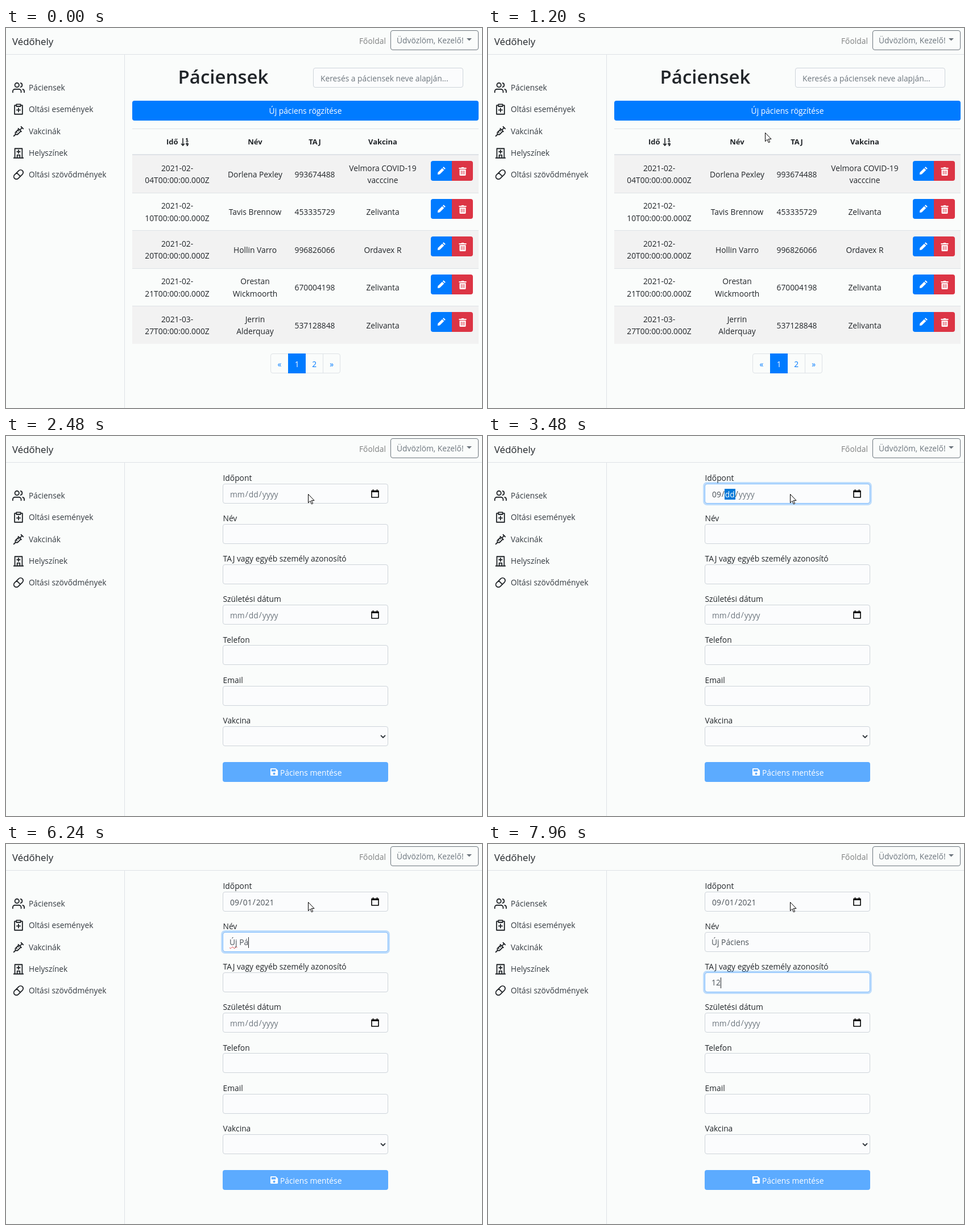
An HTML page that plays this animation: 837 px wide and 669 px high, repeating every 8 s.

```html
<!DOCTYPE html>
<html lang="hu">
<head>
<meta charset="utf-8">
<title>Páciensek</title>
<style>
  html, body { margin: 0; width: 100%; height: 100%; overflow: hidden; background: #fafcfb; }
  body { font: 13.8px/21.6px "Open Sans", "Noto Sans", sans-serif; color: #212529; }
  #stage { position: relative; width: 837px; height: 669px; overflow: hidden; }
  #stage div, #stage svg { position: absolute; box-sizing: border-box; }
  #list, #form { inset: 0; }
  .text { white-space: pre; }
  .mid { width: 240px; margin-left: -120px; text-align: center; }
  .bold { font-weight: 700; font-size: 13px; }
  .title { font-size: 33px; font-weight: 600; }
  .brand { font-size: 16.9px; }
  .nav { color: #343a40; }
  .faint { color: #7f8080; }
  .grey { color: #6c757d; }
  .white { color: #fff; }
  .link { color: #007bff; }
  .line { background: #dee2e6; }
  .field { border: 1px solid #ced4da; border-radius: 4px; background: #fbfcfd; }
  .outline { border: 1px solid #6c757d; border-radius: 4px; }
  .primary { background: #007bff; }
  .danger { background: #dc3545; }
  .dark { background: #0069d9; }
  .pale { background: #5cabff; }
  .round { border-radius: 4px; }
  .left { border-radius: 4px 0 0 4px; }
  .right { border-radius: 0 4px 4px 0; }
  .page { border: 1px solid #dee2e6; }
  .row { border-top: 1px solid #dee2e6; }
  .row.odd { background: #f2f2f2; }
  .row.hover { background: #ebebec; }
  .ring { inset: -1px; border: 1px solid #80bdff; border-radius: 4px; box-shadow: 0 0 0 2.9px rgba(0, 123, 255, .25); opacity: 0; }
  .value { left: 11px; top: 1px; height: 32px; display: flex; align-items: center; white-space: pre; color: #495057; }
  .seg { padding: 0 1px; line-height: 19px; }
  .empty { color: #6c757d; }
  .seg.on { background: #0078d7; color: #fff; }
  .caret { width: 1px; height: 19px; margin-right: -1px; background: #212529; }
  .typo { text-decoration: underline wavy #e03c3c 1px; text-decoration-skip-ink: none; text-underline-offset: 2px; }
</style>
</head>
<body>
<div id="stage">
  <div id="list"></div>
  <div id="form"></div>
</div>
<script>
const stage = document.getElementById('stage');
const list = document.getElementById('list');
const form = document.getElementById('form');

function add(parent, cls, css, html = '') {
  const el = document.createElement('div');
  el.className = cls;
  el.style.cssText = css;
  el.innerHTML = html;
  return parent.appendChild(el);
}
const box = (parent, x, y, w, h, cls) =>
  add(parent, cls, `left:${x}px;top:${y}px;width:${w}px;height:${h}px`);

// y is the vertical centre of the text block
function text(parent, x, y, str, cls = '') {
  const lines = str.split('\n').length;
  return add(parent, 'text ' + cls, `left:${x}px;top:${y - 10.8 * lines + .75}px`, str);
}
function icon(parent, x, y, size, view, body) {
  parent.insertAdjacentHTML('beforeend',
    `<svg style="left:${x}px;top:${y}px" width="${size}" height="${size}" viewBox="0 0 ${view} ${view}">${body}</svg>`);
  return parent.lastElementChild;
}
const stroke = (d, color = '#212529', w = 2) =>
  `<path d="${d}" fill="none" stroke="${color}" stroke-width="${w}" stroke-linecap="round" stroke-linejoin="round"/>`;
const fill = (d, color = '#fff') => `<path d="${d}" fill="${color}" fill-rule="evenodd"/>`;

const pencil = fill('M11.5 1.2l3.3 3.3L13.2 6.1 9.9 2.8zM9 3.7L12.3 7l-7.6 7.6L1 15l.4-3.7z');
const trash = fill('M1.5 2h4l1-1h3l1 1h4v2h-13zM2.5 5h11v9.5a1.5 1.5 0 0 1-1.5 1.5H4a1.5 1.5 0 0 1-1.5-1.5z')
  + stroke('M5.5 7.3v6M8 7.3v6M10.5 7.3v6', '#dc3545', 1);
const save = fill('M1 2.5A1.5 1.5 0 0 1 2.5 1H11l4 4v8.5a1.5 1.5 0 0 1-1.5 1.5h-11A1.5 1.5 0 0 1 1 13.5zM3 3v4h8V3zM8 9a2.2 2.2 0 1 0 0 4.4a2.2 2.2 0 1 0 0-4.4');
const calendar = stroke('M2 3.5h12V15H2zM4.5 1.5v2M11.5 1.5v2', '#000', 1.6) + fill('M2 3h12v3H2z', '#000');
const sort = stroke('M4 1.5v12M1.5 11L4 14l2.5-3M10 2.5l1.5-1v5M10 6.5h3M13 11a1.5 1.5 0 1 1 0-.1v1.5l-1.5 2', '#212529', 1.6);

// Header and sidebar
text(stage, 11, 22.6, 'Védőhely', 'brand');
text(stage, 621, 22, 'Főoldal', 'faint');
box(stage, 676, 4, 155, 35, 'outline');
text(stage, 687, 21, 'Üdvözlöm, Kezelő!', 'grey');
icon(stage, 810, 18, 9, 9, fill('M0 0h9L4.5 4.5z', '#6c757d'));
box(stage, 0, 46, 837, 1, 'line');
box(stage, 208, 47, 1, 622, 'line');
[
  ['Páciensek', 'M9 3a4 4 0 1 1 0 8a4 4 0 1 1 0-8M17 21v-2a4 4 0 0 0-4-4H5a4 4 0 0 0-4 4v2M23 21v-2a4 4 0 0 0-3-3.87M16 3.13a4 4 0 0 1 0 7.75'],
  ['Oltási események', 'M8 4.5H4.5V21.5h15v-17H16M8 2.5h8v4H8zM12 10v7M8.5 13.5h7'],
  ['Vakcinák', 'M17 3l4 4M19 5l-4.5 4.5M11.5 6.5l6 6M16.5 11.5L10 18H6v-4l6.5-6.5M7.5 12.5L9 14M10.5 9.5L12 11M3 21l3-3'],
  ['Helyszínek', 'M3 21.5h18M5 21V3.5h14V21M9.5 21v-5h5v5M12 6.5v6M9 9.5h6'],
  ['Oltási szövődmények', 'M4.5 12.5l8-8a4.94 4.94 0 0 1 7 7l-8 8a4.94 4.94 0 0 1-7-7M8.5 8.5l7 7'],
].forEach(([name, d], i) => {
  const y = 104 + 38.3 * i;
  icon(stage, 11, y - 10, 22, 24, stroke(d));
  text(stage, 40, y, name, 'nav');
});

// Patient list
text(list, 382, 85.5, 'Páciensek', 'mid title');
box(list, 540, 70, 264, 35, 'field');
text(list, 553, 88.5, 'Keresés a páciensek neve alapján...', 'grey');
box(list, 222, 128, 609, 35, 'primary round');
const hoverFill = box(list, 222, 128, 609, 35, 'dark round');
text(list, 526.5, 145.2, 'Új páciens rögzítése', 'mid white');
box(list, 222, 177, 609, 1, 'line');
text(list, 282, 200, 'Idő', 'bold');
icon(list, 307, 193, 15, 15, sort);
text(list, 438, 200, 'Név', 'mid bold');
text(list, 543, 200, 'TAJ', 'mid bold');
text(list, 662.5, 200, 'Vakcina', 'mid bold');

const rowTop = i => Math.round(223.3 + 66.5 * i);
const rows = [
  ['02-\n04', 'Dorlena Pexley', '993674488', 'Velmora COVID-19\nvacccine'],
  ['02-\n10', 'Tavis Brennow', '453335729', 'Zelivanta'],
  ['02-\n20', 'Hollin Varro', '996826066', 'Ordavex R'],
  ['02-\n21', 'Orestan\nWickmoorth', '670004198', 'Zelivanta'],
  ['03-\n27', 'Jerrin\nAlderquay', '537128848', 'Zelivanta'],
].map(([date, name, taj, vaccine], i) => {
  const y = rowTop(i), mid = 256.6 + 66.5 * i;
  const row = box(list, 222, y, 609, rowTop(i + 1) - y, i % 2 ? 'row' : 'row odd');
  text(list, 301, mid, `2021-${date}T00:00:00.000Z`, 'mid');
  text(list, 438, mid, name, 'mid');
  text(list, 543, mid, taj, 'mid');
  text(list, 662.5, mid, vaccine, 'mid');
  box(list, 747, y + 11, 37, 35, 'primary left');
  box(list, 784, y + 11, 37, 35, 'danger right');
  icon(list, 758, y + 20, 16, 16, pencil);
  icon(list, 794.5, y + 20.5, 16, 16, trash);
  return row;
});
box(list, 222, 222, 609, 2, 'line');

box(list, 465, 573, 123, 35, 'page round');
box(list, 496, 573, 31, 35, 'primary');
box(list, 557, 573, 1, 35, 'line');
['«', '1', '2', '»'].forEach((s, i) =>
  text(list, 481 + 30.6 * i, 591, s, i === 1 ? 'mid white' : 'mid link'));

// New patient form
const fields = ['Időpont', 'Név', 'TAJ vagy egyéb személy azonosító', 'Születési dátum', 'Telefon', 'Email', 'Vakcina']
  .map((name, i) => {
    const y = 73.2 + 71.1 * i;
    text(form, 381.5, y, name);
    const field = box(form, 381, Math.round(y + 10.8), 291, 35, 'field');
    return { ring: add(field, 'ring', ''), value: add(field, 'value', ''), field };
  });
for (const i of [0, 3]) icon(fields[i].field, 259, 8, 16, 16, calendar);
icon(fields[6].field, 276, 14, 10, 10, stroke('M1.5 1.5L5 5l3.5-3.5', '#343a40', 1.8));
box(form, 381, 574, 291, 35, 'pale round');
icon(form, 464, 584, 15, 16, save);
text(form, 482, 592, 'Páciens mentése', 'white');

const pointer = icon(stage, 0, 0, 20, 20,
  '<path d="M.5.5v15.2l3.5-3.4 2.4 5.5 2.2-1-2.4-5.3h4.8z" fill="#fff" stroke="#000"/>');

// Timeline
const FORM_AT = 1680, BUTTON_AT = 1280;
const FOCUS = [2490, 4960, 7360, Infinity];
const path = [
  [360, 414, 664], [480, 417, 606], [600, 421, 540], [740, 428, 446], [880, 437, 358],
  [1020, 458, 266], [1160, 482, 195], [1280, 497, 161], [1480, 508, 148],
  [1880, 508, 148], [2000, 510, 143], [2180, 520, 124], [2340, 529, 107], [2480, 531, 102],
];
const keys = {
  month: [[0, 'mm'], [3440, '00'], [3480, '09']],
  day: [[0, 'dd'], [3720, '00'], [3800, '01']],
  year: [[0, 'yyyy'], [4360, '0002'], [4400, '0020'], [4560, '0202'], [4720, '2021']],
  name: [[5520, 'Ú'], [5760, 'j'], [5840, ' '], [6080, 'P'], [6240, 'á'], [6440, 'c'], [6600, 'i'], [6800, 'e'], [6880, 'n'], [7040, 's']],
  taj: [[7800, '1'], [7960, '2']],
};

const clamp = v => Math.min(1, Math.max(0, v));
const fade = (t, from) => { const k = clamp((t - from) / 150); return k * k * (3 - 2 * k); };
const pressed = (steps, t) => steps.filter(([at]) => at <= t);

function pointerAt(t) {
  const next = path.findIndex(p => p[0] > t);
  if (next < 0) return path[path.length - 1].slice(1);
  const [a, b] = [path[next - 1], path[next]];
  const k = (t - a[0]) / (b[0] - a[0]);
  return [a[1] + (b[1] - a[1]) * k, a[2] + (b[2] - a[2]) * k];
}

function dateHtml(t) {
  const active = t < FOCUS[0] || t >= FOCUS[1] ? -1 : t < 3480 ? 0 : t < 3800 ? 1 : 2;
  return ['month', 'day', 'year'].map((part, i) => {
    const value = pressed(keys[part], t).pop()[1];
    const cls = (/\d/.test(value) ? '' : ' empty') + (i === active ? ' on' : '');
    return `<span class="seg${cls}">${value}</span>`;
  }).join(`<span class="${t < 3440 ? 'empty' : ''}">/</span>`);
}

function typedHtml(steps, t, from, to) {
  const done = pressed(steps, t);
  let str = done.map(k => k[1]).join('');
  if (t < from || t >= to) return `<span>${str}</span>`;
  if (str.startsWith('Új ')) str = '<span class="typo">Új</span>' + str.slice(2);
  const last = done.length ? done[done.length - 1][0] : from;
  const caret = t - last < 480 ? '<i class="caret"></i>' : '';
  return `<span>${str}</span>${caret}`;
}

function setHtml(el, html) {
  if (el.shown !== html) el.innerHTML = el.shown = html;
}

function draw(t) {
  const onForm = t >= FORM_AT;
  list.style.display = onForm ? 'none' : '';
  form.style.display = onForm ? '' : 'none';

  const moving = t >= path[0][0];
  pointer.style.display = moving ? '' : 'none';
  const [x, y] = moving ? pointerAt(t) : [0, 0];
  pointer.style.transform = `translate(${Math.round(x)}px,${Math.round(y)}px)`;

  rows.forEach((row, i) => row.classList.toggle('hover', y >= rowTop(i) && y < rowTop(i + 1)));
  hoverFill.style.opacity = fade(t, BUTTON_AT);

  for (let i = 0; i < 3; i++)
    fields[i].ring.style.opacity = fade(t, FOCUS[i]) - fade(t, FOCUS[i + 1]);
  setHtml(fields[0].value, dateHtml(t));
  setHtml(fields[1].value, typedHtml(keys.name, t, FOCUS[1], FOCUS[2]));
  setHtml(fields[2].value, typedHtml(keys.taj, t, FOCUS[2], FOCUS[3]));
  setHtml(fields[3].value, dateHtml(0));
}

const start = performance.now();
function tick() {
  const t = (performance.now() - start) % 8000;
  draw(t - t % 40);
  requestAnimationFrame(tick);
}
tick();
</script>
</body>
</html>
```
